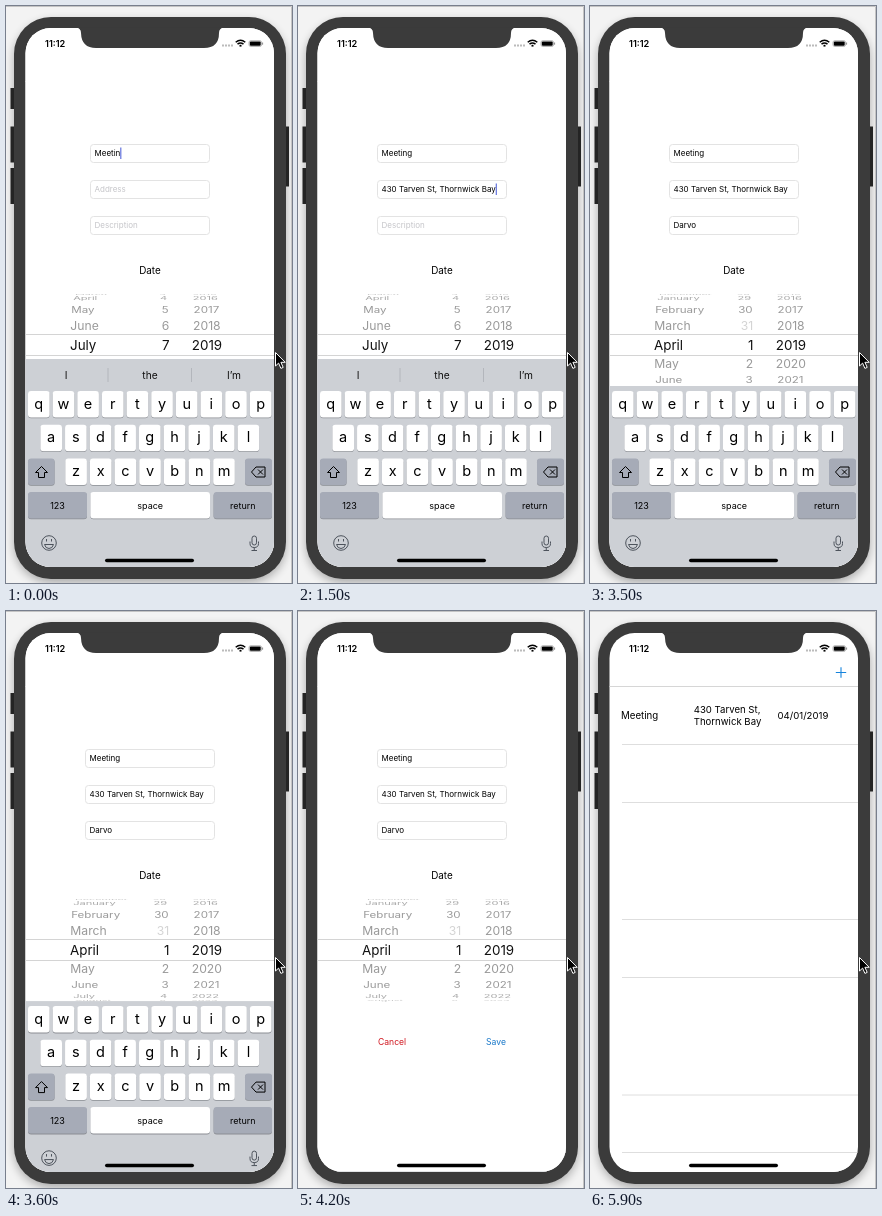
Write an HTML page that moves like this. It is 286x577 px and loops after 6 s.

```html
<!DOCTYPE html>
<html lang="en">
<head>
<meta charset="utf-8">
<style>
html, body { margin: 0; width: 100%; height: 100%; overflow: hidden; background: #f3f3f3; }
svg { display: block; width: 286px; height: 577px; font-family: Inter, Roboto, sans-serif; }
text { white-space: pre; }
</style>
</head>
<body>
<svg viewBox="0 0 286 577">
  <defs>
    <filter id="blur" x="-20%" y="-20%" width="140%" height="140%"><feGaussianBlur stdDeviation="5"/></filter>
    <clipPath id="glass"><rect x="19.5" y="22" width="248.5" height="539" rx="25"/></clipPath>
  </defs>
  <rect width="286" height="577" fill="#f3f3f3"/>
  <rect x="8" y="15" width="272" height="562" rx="38" fill="#000" opacity=".3" filter="url(#blur)"/>
  <path d="M0 .5H285.5V577" fill="none" stroke="#c4c4c4"/>
  <path d="M4.5 82h5v21h-5zM4.5 120.500h5v36h-5zM4.500 162h5v36h-5zM278 120.500h5v60h-5z" fill="#242424"/>
  <rect x="8" y="11" width="272" height="562" rx="37" fill="#3b3b3b"/>
  <g clip-path="url(#glass)">
    <rect x="19" y="22" width="250" height="540" fill="#fff"/>
    <g id="list"></g>
    <g id="form"></g>
    <g id="keyboard"></g>
    <rect x="99" y="552.700" width="89" height="3.500" rx="1.750" fill="#000"/>
  </g>
  <path d="M70 21.500Q75 22 75 27Q75.500 42 90 42H198Q213 42 213 27Q213 22 218 21.500Z" fill="#3b3b3b"/>
  <text x="39" y="40.700" font-size="9.200" font-weight="600">11:12</text>
  <path d="M216 39.500h11" stroke="#bbb" stroke-width="1.800" stroke-dasharray="2 1"/>
  <g fill="none" stroke="#000" stroke-width="1.500">
    <path d="M229.700 36.300q4.800-4.200 9.600 0M231.500 38.200q3-2.500 6 0"/>
    <path d="M233.500 39.700h2" stroke-width="1.800"/>
  </g>
  <rect x="243" y="34.700" width="12.500" height="5.800" rx="1.700" fill="none" stroke="#999" stroke-width=".7"/>
  <rect x="243.800" y="35.500" width="10.900" height="4.200" rx="1"/>
  <path d="M256.600 36.500v2.200" stroke="#888"/>
  <path d="M269.500 346.500v13.500l3.100-2.900 2.300 5.300 2.300-1-2.300-5.100h4.300z" fill="#000" stroke="#fff"/>
</svg>
<script>
const LOOP = 6000, STEP = 100;
const ADDRESS = ['430 Tarven St,', 'Thornwick Bay'];
const MONTHS = ['January', 'February', 'March', 'April', 'May', 'June', 'July',
  'August', 'September', 'October', 'November', 'December'];
const [list, form, keyboard] = ['list', 'form', 'keyboard'].map(id => document.getElementById(id));
const pen = document.createElement('canvas').getContext('2d');

const text = (s, x, y, size, fill = '#000', anchor = 'start', extra = '') =>
  `<text x="${x}" y="${y}" font-size="${size}" fill="${fill}" text-anchor="${anchor}" ${extra}>${s}</text>`;
const line = (d, color, more = '') => `<path d="${d}" fill="none" stroke="${color}" ${more}/>`;
const mod = (n, m) => (n % m + m) % m;

function widthOf(s) {
  pen.font = '8px Inter, Roboto, sans-serif';
  return pen.measureText(s).width;
}

// Critically damped spring from 0 to 1
function spring(ms, rate) {
  const x = Math.max(0, ms) / 1000 * rate;
  return 1 - (1 + x) * Math.exp(-x);
}

function buildList() {
  const rows = [133.5, 191.5, 308.5, 366.5, 484, 541.5];
  return line('M19 75.500H268', '#d6d6d6') +
    line(rows.map(y => `M32 ${y}H268`).join(''), '#dedede') +
    line('M245.800 61.500h10.400M251 56.300v10.400', '#1583dc', 'stroke-width="1.100"') +
    text('Meeting', 31, 108, 9.7) +
    ADDRESS.map((s, i) => text(s, 103.7, 102 + 12 * i, 9.6)).join('') +
    text('04/01/2019', 187.5, 108, 9.6);
}

function key(label, x, y, w, size = 14.5, fill = '#fff') {
  const cap = (dy, color) => `<rect x="${x}" y="${y + dy}" width="${w}" height="26.500" rx="3" fill="${color}"/>`;
  return cap(.8, '#8b8e94') + cap(0, fill) +
    text(label, x + w / 2, y + (size > 10 ? 17.5 : 16.5), size, '#000', 'middle');
}

function buildKeyboard() {
  const gray = '#a6abb7', ink = '#4d535c';
  const letters = ['qwertyuiop', 'asdfghjkl', 'zxcvbnm'].map((row, r) =>
    [...row].map((c, i) => key(c, [22, 34.4, 59.3][r] + 24.65 * i, 385 + 33.7 * r, 21.6)).join('')).join('');
  return '<rect x="19" y="380" width="250" height="190" fill="#cdd0d5"/>' + letters +
    key('', 22, 452.4, 26.6, 9, gray) + key('', 239, 452.4, 27, 9, gray) +
    key('123', 22, 486, 59, 9, gray) + key('space', 84.4, 486, 119.6, 9) + key('return', 207.6, 486, 58.4, 9, gray) +
    line('M35.500 460.500l6 6h-3v5h-6v-5h-3z', '#000', 'stroke-linejoin="round"') +
    line('M245.500 466l4.500-5h9v10h-9zM252 463.500l5 5m0-5l-5 5', '#000', 'stroke-linejoin="round"') +
    `<circle cx="43" cy="537" r="7.300" fill="none" stroke="${ink}"/>` +
    line('M38.500 538.500h9q-1 4-4.500 4t-4.500-4M40.500 533v2.500M45.500 533v2.500', ink) +
    '<rect x="246" y="530" width="4.500" height="9" rx="2.250" fill="none" stroke="' + ink + '"/>' +
    line('M244 535.500v2q0 4 4.250 4t4.250-4v-2M248.250 541.500v3M245.500 544.500h5.500', ink);
}

function buildBar() {
  return '<rect x="19" y="353" width="250" height="28" fill="#cdd0d5"/>' +
    line('M102 362v14M185.500 362v14', '#b3b6bc') +
    ['I', 'the', 'I’m'].map((s, i) => text(s, 60 + 84 * i, 373, 10.2, '#111', 'middle')).join('');
}

function pickerRow(i, month, day) {
  const k = Math.abs(i), turn = i * .385;
  const size = [13.4, 12.2, 11.6, 11.1, 10.8][k];
  const fill = ['#111', '#999', '#999', '#aaa', '#c4c4c4'][k];
  const squash = Math.max(.1, Math.cos(turn)), y = 339 + 50.5 * Math.sin(turn);
  const inset = [0, .3, 1.2, 3.2, 5][k];
  const monthDays = [3, 5, 8, 10].includes(month) ? 30 : 31;
  const d = mod(day + i - 1, 31) + 1;
  return `<g transform="translate(0 ${y}) scale(1 ${squash})">` +
    text(MONTHS[mod(month + i, 12)], 64 + inset, size * .36, size, fill) +
    text(d, 163.5 - inset * .7, size * .36, size, d > monthDays ? '#d4d4d4' : fill, 'end') +
    text(2019 + i, 201 - inset * .5, size * .36, size, fill, 'middle') + '</g>';
}

function buildForm(t) {
  const typed = Math.round(28 * Math.min(1, Math.max(0, (t - 600) / 900)));
  const note = t < 2000 ? 0 : t < 2100 ? 2 : t < 2200 ? 4 : 5;
  const values = [t < 100 ? 'Meetin' : 'Meeting', ADDRESS.join(' ').slice(0, typed), 'Darvo'.slice(0, note)];
  const focus = t < 600 ? 0 : t < 1600 ? 1 : 2;
  const caret = t < 3100 ? 1 : Math.max(0, 1 - (t - 3000) / 300);
  const wide = t >= 1500, left = wide ? 79.5 : 84.5, width = wide ? 129 : 119;

  const fields = ['Name', 'Address', 'Description'].map((hint, i) => {
    const y = 138.5 + 36 * i, value = values[i], x = left + 4;
    return `<rect x="${left}" y="${y}" width="${width}" height="18" rx="3" fill="#fff" stroke="#e3e3e3"/>` +
      text(value || hint, x, y + 11.8, 8, value ? '#000' : '#c5c5c9') +
      (i === focus ? line(`M${x + widthOf(value) + .5} ${y + 3}v11.500`, '#4357d6', `opacity="${caret}"`) : '');
  }).join('');

  const month = t < 2700 ? 6 : 3, day = t < 2900 ? 7 : 1;
  const picker = [-4, -3, -2, -1, 0, 1, 2, 3, 4].map(i => pickerRow(i, month, day)).join('');
  const press = t < 4500 || t >= 5100 ? 1 : t < 4700 ? .25 : .25 + .7 * (t - 4600) / 300;

  return '<rect x="19" y="22" width="250" height="540" fill="#fff"/>' + fields +
    text('Date', 144, 268.3, 9.9, '#000', 'middle') + picker +
    line('M19 328.500H268M19 349.500H268', '#d4d4d4') +
    text('Cancel', 80, 434, 8.6, '#d0161f') +
    text('Save', 188, 434, 8.6, '#1777c9', 'start', `opacity="${press}"`);
}

list.innerHTML = buildList();
const keys = buildKeyboard(), bar = buildBar();
let shown = -1;

function draw(now) {
  const t = Math.floor(now % LOOP / STEP) * STEP;
  if (t !== shown) {
    shown = t;
    form.innerHTML = buildForm(t);
    form.setAttribute('transform', `translate(0 ${540 * spring(t - 5450, 13.8)})`);
    keyboard.innerHTML = t < 4600 ? keys + (t < 3500 ? bar : '') : '';
    keyboard.setAttribute('transform', `translate(0 ${181 * spring(t - 3570, 12.6)})`);
  }
  requestAnimationFrame(draw);
}

const start = performance.now();
const tick = () => draw(Math.max(0, performance.now() - start));
draw = (original => () => original(Math.max(0, performance.now() - start)))(draw);
document.fonts.ready.then(() => { shown = -1; });
tick();
</script>
</body>
</html>
```
